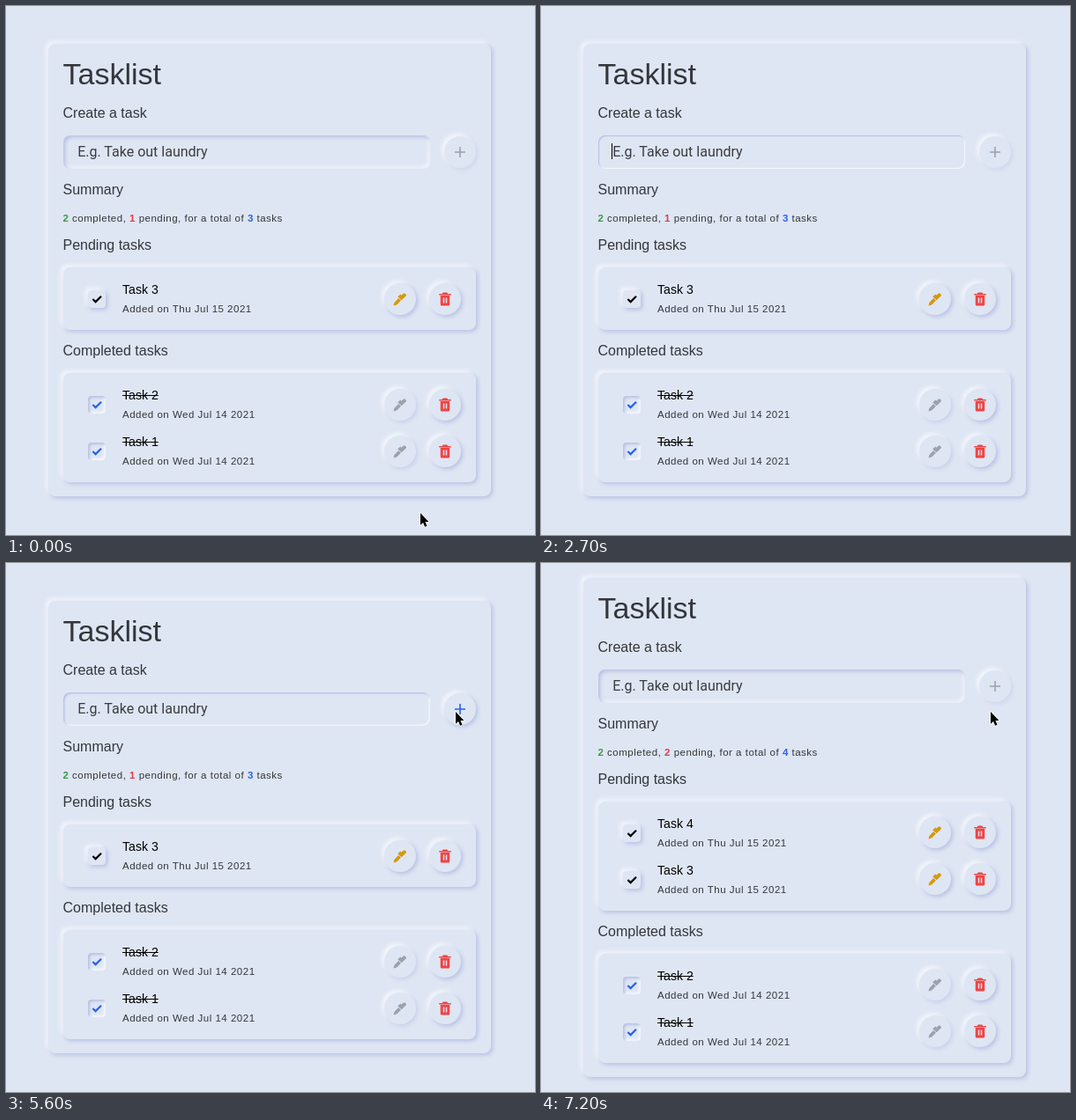
An HTML page for the animation above (8000 ms loop, 600 by 601 pixels).

```html
<!DOCTYPE html>
<html lang="en">
<head>
<meta charset="utf-8">
<title>Tasklist</title>
<style>
  :root { --bg: #dfe6f3; --dark: 174, 185, 225; --light: 247, 249, 254; --focus: 0; --ready: 0; }
  html, body { margin: 0; width: 100%; height: 100%; overflow: hidden; background: var(--bg); }
  body { position: relative; display: flex; align-items: center; color: #33363b;
         font: 16px "Liberation Sans", Arial, sans-serif; }
  .raised { --depth: 1; border-radius: 8px; background: var(--bg);
            box-shadow: 2px 2px 5px rgba(var(--dark), calc(.85 * var(--depth))),
                        -3px -3px 4px rgba(var(--light), .85); }
  .panel { position: relative; left: 48px; top: -.5px; width: 468.5px; padding: 0 16.5px 16px; flex: none; }
  h1, h2, p { margin: 0; font-weight: normal; white-space: nowrap; }
  h1 { height: 55px; font-size: 34px; line-height: 69px; }
  h2 { height: 49px; font-size: 16px; line-height: 48px; }
  .small { font-size: 11.5px; letter-spacing: .5px; }
  .summary { height: 14px; line-height: 14px; }
  .form { position: relative; height: 38px; }
  .field { box-sizing: border-box; width: 416.5px; height: 38px; padding-left: 15.5px; border-radius: 8px;
           line-height: 38px; white-space: pre; color: #000;
           --d: calc(2px - 1px * var(--focus)); --b: calc(4px - 3px * var(--focus));
           box-shadow: inset var(--d) var(--d) var(--b) rgba(var(--dark), .9),
                       inset calc(-1 * var(--d)) calc(-1 * var(--d)) var(--b) rgba(var(--light), .9); }
  .field.empty { padding-left: 16.7px; font-family: Roboto, sans-serif; color: #3a3d43; }
  .caret { display: inline-block; width: 1.2px; height: 18px; margin-right: -1.2px;
           vertical-align: -3px; background: #000; }
  .empty .caret { margin: 0 0 0 -1.2px; }
  .list { padding: 9px 0; }
  .row { position: relative; height: 53px; }
  .row p { position: absolute; left: 67.5px; line-height: 22px; }
  .name { top: 5px; font-size: 14.1px; color: #000; }
  .row .small { top: 27px; }
  .done .name { text-decoration: line-through; }
  .box { position: absolute; left: 28px; top: 17px; width: 20px; height: 20px; border-radius: 4px; color: #000; }
  .done .box { color: #2563eb; box-shadow: inset 2px 2px 3px rgba(var(--dark), .8),
                                           inset -2px -2px 3px rgba(var(--light), .9); }
  .round { position: absolute; top: 8.5px; width: 36px; height: 36px; border-radius: 50%; }
  .round svg { position: absolute; left: 9px; top: 9px; }
  .edit { left: 364.5px; color: #d6980c; }
  .done .edit { --depth: .55; color: #9ca1ac; }
  .trash { left: 415.5px; color: #ef4444; }
  .add { left: 432.5px; top: 1px; --depth: calc(.4 + .6 * var(--ready));
         color: color-mix(in srgb, #2563eb calc(100% * var(--ready)), #9ca1ac); }
  svg { display: block; overflow: visible; }
  .pointer { position: absolute; left: 0; top: 0; }
</style>
</head>
<body>
<main class="panel raised">
  <h1>Tasklist</h1>
  <h2>Create a task</h2>
  <div class="form">
    <div class="field"><span class="caret"></span></div>
    <div class="round raised add">
      <svg width="18" height="18" fill="none" stroke="currentColor" stroke-width="1.6"><path d="M3 9h12M9 3v12"/></svg>
    </div>
  </div>
  <h2>Summary</h2>
  <p class="small summary"><b style="color:#3a9a46">2</b> completed, <b id="pending" style="color:#e03a4b">1</b> pending, for a total of <b id="total" style="color:#2563eb">3</b> tasks</p>
  <h2>Pending tasks</h2>
  <div class="list raised" id="todo"></div>
  <h2>Completed tasks</h2>
  <div class="list raised" id="finished"></div>
</main>
<svg class="pointer" width="20" height="20" stroke-linejoin="round">
  <path id="arrow" transform="scale(.95)" d="M0 0V14.4L3.2 11.5L5.4 16.5L7.9 15.4L5.8 10.5H10Z" stroke="#fff" stroke-width="1.6" paint-order="stroke"/>
  <g id="beam" fill="none">
    <path id="bar" d="M-3 -6.5Q0 -6.5 0 -4.5Q0 -6.5 3 -6.5M0 -5V5M-3 6.5Q0 6.5 0 4.5Q0 6.5 3 6.5M-1.5 2.5H1.5" stroke="#fff" stroke-width="3"/>
    <path d="M-3 -6.5Q0 -6.5 0 -4.5Q0 -6.5 3 -6.5M0 -5V5M-3 6.5Q0 6.5 0 4.5Q0 6.5 3 6.5M-1.5 2.5H1.5" stroke="#000" stroke-width="1.2"/>
  </g>
</svg>
<script>
const LOOP = 8000, STEP = 100, ROW = 53;
const FOCUS = 1600, CLICK = 5600, ADDED = 6750;
const TEXT = 'Task 4', KEYS = [2800, 2900, 3000, 3100, 3500, 4000];
// time, x, y of the pointer
const PATH = [[100, 470, 576], [500, 330, 326], [600, 330, 326], [1500, 245, 172], [4300, 245, 172],
              [4700, 400, 142], [4900, 464, 147], [5200, 506, 162], [5400, 510, 169]];

const $ = selector => document.querySelector(selector);
const ramp = (t, from, to) => Math.min(1, Math.max(0, (t - from) / (to - from)));

const icon = body => `<svg width="18" height="18" viewBox="0 0 24 24" fill="currentColor">${body}</svg>`;
const PEN = icon(`<path d="M2 22L3.2 17.2L9.6 10.8L13.2 14.4L6.8 20.8Z"/>
  <path d="M9.4 9.4L8.2 8.2L12.6 4.8L14 6.2L16.8 3.6Q18.3 2.4 19.6 3.6L20.8 4.8Q21.9 6.1 20.8 7.4L14.2 13.8Z"/>`);
const TRASH = icon(`<path fill-rule="evenodd" d="M5 6.5H19V20a2 2 0 0 1-2 2H7a2 2 0 0 1-2-2ZM9 10V18H11V10ZM13 10V18H15V10Z
  M9 2H15L16.6 4H21V6H3V4H7.4Z"/>`);
const CHECK = `<svg width="20" height="20" fill="none" stroke="currentColor" stroke-width="2.2"><path d="M5.4 10L8.6 13.1L15 6.7"/></svg>`;

const row = (number, date, done) => `<div class="row ${done ? 'done' : ''}">
  <div class="box raised">${CHECK}</div>
  <p class="name">Task ${number}</p><p class="small">Added on ${date} 2021</p>
  <div class="round raised edit">${PEN}</div><div class="round raised trash">${TRASH}</div></div>`;
$('#todo').innerHTML = row(4, 'Thu Jul 15') + row(3, 'Thu Jul 15');
$('#finished').innerHTML = row(2, 'Wed Jul 14', true) + row(1, 'Wed Jul 14', true);

const caret = $('.caret'), field = $('.field'), newRow = $('#todo .row');
const label = field.insertBefore(document.createTextNode(''), caret);

function pointerAt(t) {
  const next = PATH.findIndex(point => point[0] > t);
  if (next === 0) return PATH[0].slice(1);
  if (next < 0) return PATH.at(-1).slice(1);
  const [a, b] = [PATH[next - 1], PATH[next]], p = ramp(t, a[0], b[0]);
  return [1, 2].map(i => a[i] + (b[i] - a[i]) * p);
}

function drawField(t) {
  const pressed = KEYS.filter(key => key <= t);
  const typed = t < CLICK ? TEXT.slice(0, pressed.length) : '';
  const lastInput = Math.max(FOCUS, ...pressed);
  const focused = t >= FOCUS && t < CLICK;
  field.classList.toggle('empty', !typed);
  label.data = typed || 'E.g. Take out laundry';
  field.insertBefore(caret, typed ? null : label);
  caret.style.visibility = focused && (t - lastInput) % 1000 < 500 ? 'visible' : 'hidden';
}

function drawPointer(t) {
  const [x, y] = pointerAt(t);
  const overField = x > 65 && x < 481 && y > 147 && y < 186;
  $('.pointer').style.transform = `translate(${x}px, ${y}px)`;
  $('.pointer').style.visibility = t >= 1700 && t < 4400 ? 'hidden' : 'visible';
  $('#beam').style.display = overField ? '' : 'none';
  $('#arrow').style.display = overField ? 'none' : '';
}

function draw(t) {
  const root = document.documentElement.style;
  root.setProperty('--focus', ramp(t, 1500, 1700) - ramp(t, CLICK - 100, CLICK + 200));
  root.setProperty('--ready', ramp(t, 2750, 3050) - ramp(t, CLICK, CLICK + 400));
  drawField(t);
  drawPointer(t);

  const added = t >= ADDED, grown = 1 - (1 - ramp(t, ADDED, 7200)) ** 3;
  newRow.style.height = ROW * grown + 'px';
  newRow.style.overflow = grown < 1 ? 'hidden' : 'visible';
  $('#pending').textContent = added ? 2 : 1;
  $('#total').textContent = added ? 4 : 3;
}

function tick() {
  draw(Math.floor(performance.now() % LOOP / STEP) * STEP);
  requestAnimationFrame(tick);
}
tick();
</script>
</body>
</html>
```
